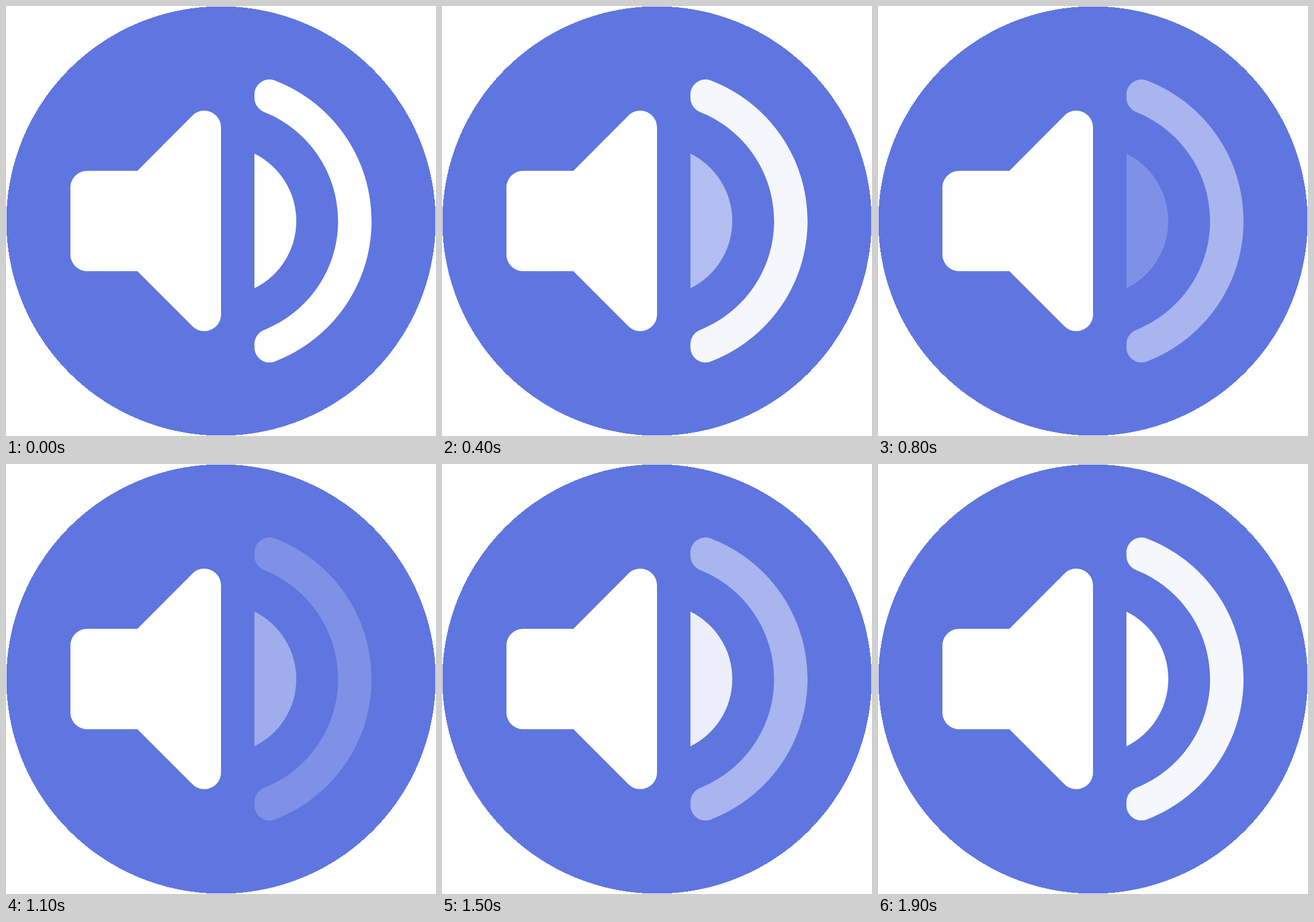
An HTML page with a canvas for the animation above (2000 ms loop, 748 by 748 pixels).

```html
<!DOCTYPE html>
<html lang="en">
<head>
<meta charset="utf-8">
<title>Speaker</title>
<style>
  html, body { margin: 0; width: 100%; height: 100%; overflow: hidden; background: #fff; }
  canvas { display: block; }
</style>
</head>
<body>
<canvas id="stage" width="748" height="748"></canvas>
<script>
const ctx = document.getElementById("stage").getContext("2d");
const SIZE = 748, MID = SIZE / 2, RADIUS = 373.4, UNIT = 29.1;
const LOOP = 2000, STEP = 100;
const FADE = 2000 / 3, LOW_END = 2800 / 3, DIM = 0.2;

// Shapes on a 24-unit grid
const speaker = new Path2D("M3 10v4c0 .55.45 1 1 1h3l3.29 3.29c.63.63 1.71.18 1.71-.71V6.41c0-.89-1.08-1.34-1.71-.71L7 9H4c-.55 0-1 .45-1 1z");
const innerWave = new Path2D("M16.5 12c0-1.77-1.02-3.29-2.5-4.03v8.05c1.48-.73 2.5-2.25 2.5-4.02z");
const outerWave = new Path2D("M14 4.45v.2c0 .38.25.71.6.85C17.18 6.53 19 9.06 19 12s-1.82 5.47-4.4 6.5c-.36.14-.6.47-.6.85v.2c0 .63.63 1.07 1.21.85C18.6 19.11 21 15.84 21 12s-2.4-7.11-5.79-8.4c-.58-.23-1.21.22-1.21.85z");

// Linear fade down, hold dim, linear fade up, hold bright
function waveAlpha(time, delay) {
  const t = (time - delay + LOOP) % LOOP;
  const level = t < LOW_END ? 1 - t / FADE : (t - LOW_END) / FADE;
  return DIM + (1 - DIM) * Math.min(1, Math.max(0, level));
}

// Hard-edged disc, filled row by row
function drawDisc() {
  ctx.fillStyle = "#5f76e0";
  for (let y = 0; y < SIZE; y++) {
    const dy = y + 0.5 - MID;
    const half = Math.round(Math.sqrt(Math.max(0, RADIUS * RADIUS - dy * dy)));
    ctx.fillRect(MID - half, y, half * 2, 1);
  }
}

function drawShape(path, alpha) {
  ctx.globalAlpha = alpha;
  ctx.fill(path);
}

function draw(time) {
  ctx.fillStyle = "#fff";
  ctx.fillRect(0, 0, SIZE, SIZE);
  drawDisc();
  ctx.save();
  ctx.translate(MID, MID);
  ctx.scale(UNIT, UNIT);
  ctx.translate(-12, -12);
  ctx.fillStyle = "#fff";
  drawShape(speaker, 1);
  drawShape(innerWave, waveAlpha(time, 0));
  drawShape(outerWave, waveAlpha(time, 350));
  ctx.restore();
}

const start = performance.now();
function tick() {
  const elapsed = (performance.now() - start) % LOOP;
  draw(Math.floor(elapsed / STEP) * STEP);
  requestAnimationFrame(tick);
}
tick();
</script>
</body>
</html>
```
